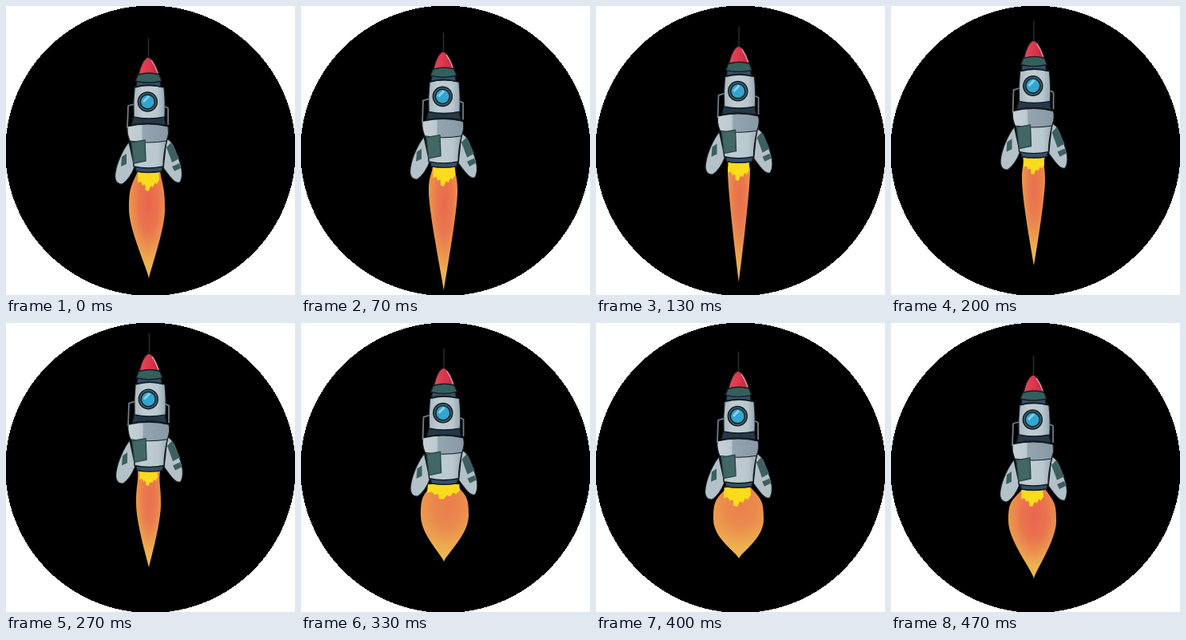
Recreate the animation shown at these times as an HTML page. Size 362 px wide and 362 px high, loop 0.54 s.

```html
<!DOCTYPE html>
<html lang="en">
<head>
<meta charset="utf-8">
<title>Rocket</title>
<style>
  html, body { margin: 0; width: 100%; height: 100%; overflow: hidden; background: #fff; }
  svg { display: block; width: 100%; height: 100%; }
</style>
</head>
<body>
<svg viewBox="0 0 362 362">
  <defs>
    <linearGradient id="fire" x1="0" y1="0" x2="0" y2="1">
      <stop offset="0" stop-color="#ec9448"/>
      <stop offset=".5" stop-color="#eb9d4e"/>
      <stop offset="1" stop-color="#efb950"/>
    </linearGradient>
    <radialGradient id="glow" cx=".54" cy=".3" r=".55">
      <stop offset="0" stop-color="#e9644f"/>
      <stop offset=".5" stop-color="#e9684f" stop-opacity=".75"/>
      <stop offset="1" stop-color="#e9704f" stop-opacity="0"/>
    </radialGradient>
    <linearGradient id="steel">
      <stop offset="0" stop-color="#a9b8c1"/>
      <stop offset=".3" stop-color="#c0ccd3"/>
      <stop offset=".75" stop-color="#b9c7cf"/>
      <stop offset="1" stop-color="#95a6b1"/>
    </linearGradient>
    <linearGradient id="rim">
      <stop offset=".1" stop-color="#c3ced5"/>
      <stop offset=".34" stop-color="#bdc9d0"/>
      <stop offset=".38" stop-color="#94a5b0"/>
      <stop offset="1" stop-color="#8799a5"/>
    </linearGradient>
    <linearGradient id="nose">
      <stop offset="0" stop-color="#e34a5c"/>
      <stop offset=".6" stop-color="#d93248"/>
      <stop offset="1" stop-color="#b92a3e"/>
    </linearGradient>
  </defs>

  <circle cx="181" cy="181.3" r="181.8" shape-rendering="crispEdges"/>

  <path id="flame" fill="url(#fire)"/>
  <path id="heat" fill="url(#glow)"/>
  <path id="core" fill="#fbdc1c" d="M.02 0H.98L1 .4L.88 .65L.8 .55L.7 .8L.6 .72L.5 1L.36 .95L.34 .65L.22 .7L.15 .5L0 .55Z"/>

  <g id="rocket" stroke="#151b20" stroke-width="1.4" stroke-linejoin="round">
    <path d="M178.5 40V65" stroke="#292d30" stroke-width="1.5"/>

    <!-- fins -->
    <path fill="#b4c1c8" d="M154 170C146 180 139 196 137 208C135 219 139 224 146 223C152 219 158 210 161 202Z"/>
    <path fill="#b4c1c8" d="M201 166C208 168 212 178 216 190C221 203 222 214 218 221C212 224 205 214 197 203Z"/>
    <g fill="#3d5f60" stroke="none">
      <path d="M145 189L151 185V198L144 201Z"/>
      <path d="M201 177L207 171L217 191L208 196Z"/>
      <path d="M208 201L217 197L219 203L211 207Z"/>
    </g>

    <!-- nozzle and lower body -->
    <path fill="#34506b" d="M161 198H197L195 207Q178 210 163 207Z"/>
    <path fill="url(#steel)" d="M155 166H202Q197 186 197 201Q178 205 160 201Q160 184 155 166Z"/>
    <path fill="url(#rim)" stroke-width="1" d="M152 151Q178 145 203 151Q205 160 201 169Q178 173 155 169Q151 160 152 151Z"/>
    <path fill="#426764" stroke="#29494a" d="M157 171L174 168L175 194L160 197Z"/>

    <!-- upper body -->
    <path fill="#243848" d="M160 137H198L200 149Q178 145 157 149Z"/>
    <path fill="url(#steel)" d="M161 102Q179 97 198 102Q200 122 199 139Q178 143 160 139Q159 120 161 102Z"/>
    <g fill="none" stroke="#6f7c83" stroke-width="1.8">
      <path d="M160 123L153 125L152 153"/>
      <path d="M199 126L203 128V149"/>
    </g>
    <circle cx="177.3" cy="120" r="12" fill="#3a606d"/>
    <circle cx="177.3" cy="120" r="9" fill="#32a5d0"/>
    <path fill="none" stroke="#86cfe4" stroke-width="3" d="M172 120L179 113"/>

    <!-- nose -->
    <path fill="#34506b" d="M164 93H193L194 101Q178 97 163 101Z"/>
    <path fill="#355f5d" d="M166 84Q179 81 191 84L195 94Q178 98 162 94Z"/>
    <path fill="url(#nose)" d="M178 64C172 66 168 77 166 86Q179 82 192 86C189 76 185 66 178 64Z"/>
    <path fill="none" stroke="#d9c3c6" stroke-width="1" d="M182 68Q187 75 190 84"/>
  </g>
</svg>
<script>
const LOOP = 540;
const $ = id => document.getElementById(id);

// at: start ms; tip, fin: nose and fin heights; flame: left, right, widest y, end y;
// core: left, right, height; heat: strength of the red glow
const poses = [
  { at: 0,   dx: 0,  tip: 64, fin: 223, flame: [154, 199, 255, 341], core: [165, 192, 24], heat: 1 },
  { at: 70,  dx: 0,  tip: 57, fin: 217, flame: [160, 196, 232, 356], core: [165, 193, 24], heat: .9 },
  { at: 130, dx: .5, tip: 50, fin: 211, flame: [165, 193, 206, 346], core: [165, 192, 23], heat: .8 },
  { at: 200, dx: .5, tip: 43, fin: 205, flame: [164, 193, 216, 325], core: [166, 192, 21], heat: .8 },
  { at: 270, dx: 1,  tip: 38, fin: 201, flame: [163, 194, 226, 306], core: [167, 190, 18], heat: .8 },
  { at: 330, dx: .5, tip: 56, fin: 217, flame: [150, 210, 241, 299], core: [158, 199, 19], heat: .5 },
  { at: 400, dx: 0,  tip: 60, fin: 221, flame: [147, 210, 246, 295], core: [160, 194, 24], heat: .45 },
  { at: 470, dx: 0,  tip: 65, fin: 224, flame: [147, 207, 248, 320], core: [163, 191, 21], heat: 1 }
];

function flamePath(top, [left, right, wide, end]) {
  const shoulder = top + (wide - top) * .4;
  const belly = wide + 24;
  const neck = end - (end - wide) * .16;
  return `M165 ${top}C${left + 3} ${shoulder} ${left} ${shoulder} ${left} ${wide}
    C${left} ${belly} 176 ${neck} 179 ${end}
    C182 ${neck} ${right} ${belly} ${right} ${wide}
    C${right} ${shoulder} ${right - 3} ${shoulder} 193 ${top}Z`;
}

function draw(now) {
  const time = now % LOOP;
  const pose = poses.findLast(p => p.at <= time);
  const top = pose.fin - 16;
  const shape = flamePath(top, pose.flame);
  const [left, right, height] = pose.core;

  $('flame').setAttribute('d', shape);
  $('heat').setAttribute('d', shape);
  $('heat').setAttribute('opacity', pose.heat);
  $('core').setAttribute('transform', `translate(${left} ${top + 1}) scale(${right - left} ${height})`);
  $('rocket').setAttribute('transform',
    `translate(${pose.dx} ${pose.fin}) scale(1 ${(pose.fin - pose.tip) / 159}) translate(0 -223)`);
  requestAnimationFrame(draw);
}
draw(performance.now());
</script>
</body>
</html>
```
